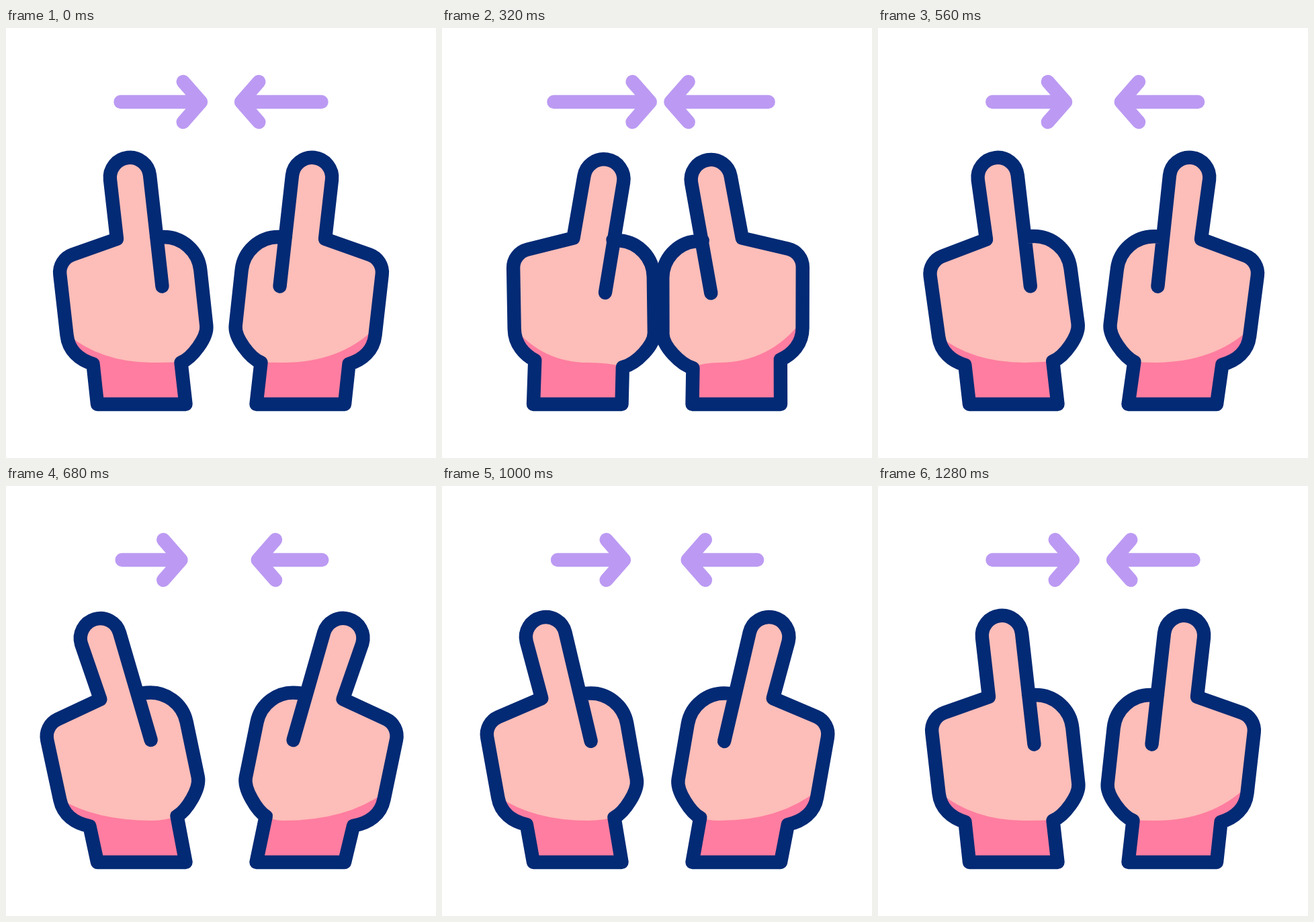
An HTML page with a canvas that plays this animation: 640x640 px, repeating every 1480 ms.

```html
<!DOCTYPE html>
<html lang="en">
<head>
<meta charset="utf-8">
<title>Two hands moving together and apart</title>
<style>
  html, body { margin: 0; width: 100%; height: 100%; overflow: hidden; background: #fff; }
  canvas { display: block; width: 100vw; height: 100vh; object-fit: contain; }
</style>
</head>
<body>
<canvas id="stage" width="640" height="640"></canvas>
<script>
const ctx = document.getElementById('stage').getContext('2d');
const NAVY = '#032a75', SKIN = '#fdbdb8', PINK = '#ff7da0', PURPLE = '#bc9af3';
const LOOP = 1480, STEP = 40, END = 1280;

// lean turns the palm about the wrist, curl turns the finger about its knuckle
// (radians); slide and tuck move palm and finger sideways; tail and tip place the arrow.
const rest = { lean: 0, slide: 0, curl: 0, tuck: 0, tail: 170.5, tip: 290 };
const left = {
  rest,
  near: { lean: .095, slide: 8.4, curl: .18, tuck: -3, tail: 166.4, tip: 309.8 },
  far: { lean: -.117, slide: -3, curl: -.099, tuck: -2, tail: 173.2, tip: 255.8 },
  shade: { edge: 455, low: 218 }
};
// Described mirrored.
const right = {
  rest,
  near: { lean: .11, slide: 2.7, curl: .178, tuck: -3, tail: 154.3, tip: 299.6 },
  far: { lean: -.112, slide: -6, curl: -.098, tuck: -3, tail: 171.2, tip: 262 },
  shade: { edge: 446, low: 228 }
};

const keys = [[40, 'rest'], [320, 'near'], [760, 'far'], [END, 'rest']];

const smooth = k => k * k * (3 - 2 * k);

function blend(a, b, k) {
  const pose = {};
  for (const name in a) pose[name] = a[name] + (b[name] - a[name]) * k;
  return pose;
}

function turn(x, y, cx, cy, angle) {
  const cos = Math.cos(angle), sin = Math.sin(angle);
  return [cx + (x - cx) * cos - (y - cy) * sin, cy + (x - cx) * sin + (y - cy) * cos];
}

// Functions that carry a point of the resting hand into the pose.
function makeRig({ lean, slide, curl, tuck }) {
  const follow = share => (x, y) => {
    const [px, py] = turn(x, y, 190, 545, lean);
    return [px + slide * share, py];
  };
  const palm = follow(1), wrist = follow(.5);
  const finger = (x, y) => {
    const [px, py] = turn(x, y, 195, 335, curl);
    return palm(px + tuck, py);
  };
  return { palm, wrist, finger };
}

function handPath({ palm, wrist, finger }, tilt) {
  const path = new Path2D();
  // Finger
  path.moveTo(...finger(232.5, 384.5));
  path.arc(...finger(184.5, 222.5), 29.7, tilt, tilt + Math.PI, true);
  path.lineTo(...palm(165, 314));
  // Outer side of the palm
  path.arcTo(...palm(77.8, 344.8), ...palm(90.5, 457), 28);
  path.lineTo(...palm(90.5, 457));
  path.bezierCurveTo(...palm(93, 480), ...palm(109.5, 494), ...wrist(129.5, 500));
  // Wrist
  path.lineTo(136, 560);
  path.lineTo(267.5, 560);
  path.lineTo(...wrist(260.5, 498));
  // Inner side and thumb
  path.bezierCurveTo(...palm(277, 491), ...palm(300.2, 461), ...palm(298.3, 443));
  path.arcTo(...palm(284, 311), ...palm(224, 311), 55);
  path.lineTo(...palm(224, 311));
  return path;
}

function drawHand(pose, shade) {
  const rig = makeRig(pose);
  const outline = handPath(rig, pose.lean + pose.curl - .115);
  ctx.fillStyle = PINK;
  ctx.fill(outline);

  const [x, y] = rig.palm(90, shade.edge);
  const [endX, endY] = rig.wrist(264, 497);
  ctx.save();
  ctx.clip(outline);
  ctx.fillStyle = SKIN;
  ctx.beginPath();
  ctx.moveTo(0, 150);
  ctx.lineTo(0, y);
  ctx.lineTo(x, y);
  ctx.quadraticCurveTo(142 + pose.lean * 90, 498, shade.low, 498);
  ctx.quadraticCurveTo((shade.low + endX) / 2, 498, endX, endY);
  ctx.lineTo(360, endY);
  ctx.lineTo(360, 150);
  ctx.fill();
  ctx.restore();

  ctx.strokeStyle = NAVY;
  ctx.stroke(outline);
}

function drawArrow({ tail, tip }) {
  ctx.strokeStyle = PURPLE;
  ctx.beginPath();
  ctx.moveTo(tail, 110);
  ctx.lineTo(tip, 110);
  ctx.moveTo(tip - 26.3, 80);
  ctx.lineTo(tip, 110);
  ctx.lineTo(tip - 26.3, 140);
  ctx.stroke();
}

function drawSide(side, from, to, k) {
  const pose = blend(side[from], side[to], k);
  drawHand(pose, side.shade);
  drawArrow(pose);
}

function draw(time) {
  const clamped = Math.min(END, Math.max(keys[0][0], time));
  const next = keys.findIndex(([at], i) => i > 0 && at >= clamped);
  const [t0, from] = keys[next - 1], [t1, to] = keys[next];
  const k = smooth((clamped - t0) / (t1 - t0));

  ctx.fillStyle = '#fff';
  ctx.fillRect(0, 0, 640, 640);
  ctx.lineWidth = 20.4;
  ctx.lineCap = ctx.lineJoin = 'round';
  drawSide(left, from, to, k);
  ctx.save();
  ctx.translate(640, 0);
  ctx.scale(-1, 1);
  drawSide(right, from, to, k);
  ctx.restore();
}

function tick() {
  const time = performance.now() % LOOP;
  draw(Math.floor(time / STEP) * STEP);
  requestAnimationFrame(tick);
}
tick();
</script>
</body>
</html>
```
